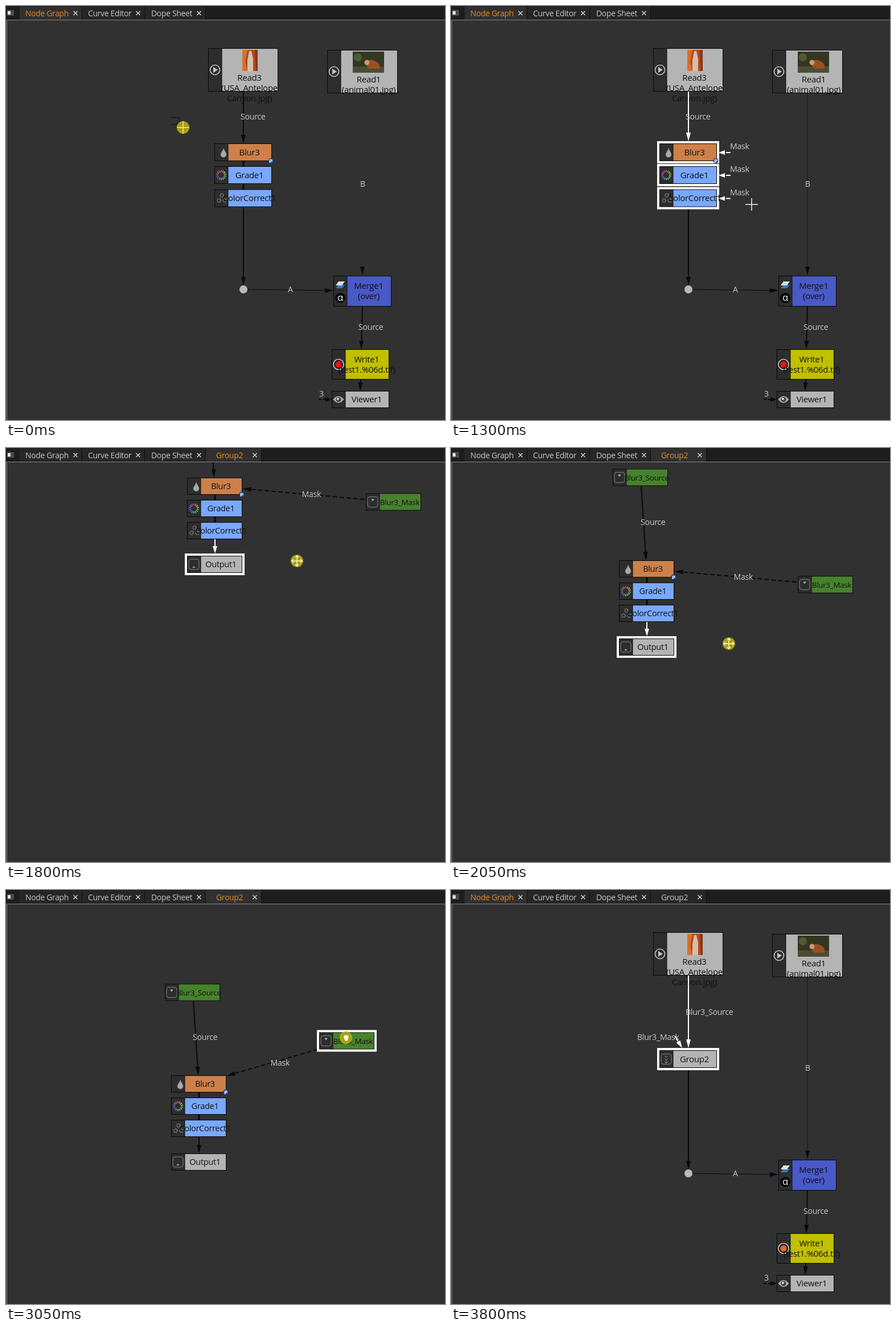
Write an HTML page that moves like this. It is 771x726 px and loops after 4850 ms.

```html
<!DOCTYPE html>
<html lang="en">
<head>
<meta charset="utf-8">
<title>Grouping nodes</title>
<style>
  html, body { margin: 0; width: 100%; height: 100%; overflow: hidden; background: #313131; }
  svg { display: block; width: 771px; height: 726px; }
  text { font: 14.2px "Open Sans", "Noto Sans", sans-serif; letter-spacing: -.3px; fill: #c8c8c8; white-space: pre; }
  .tab { font-size: 13.9px; }
  .node { font-size: 15px; fill: #111; text-anchor: middle; }
  .key { font-size: 26px; font-weight: 700; letter-spacing: 0; fill: #fff; text-anchor: middle; }
</style>
</head>
<body>
<svg id="stage" viewBox="0 0 771 726"></svg>
<script>
const LOOP = 4850;
const ORANGE = '#e88a28', GREY = '#b4b4b4', BLUE = '#7aa8ff', CLAY = '#cd804a', GREEN = '#47822d';

const rect = (x, y, w, h, fill, extra = '') =>
  `<rect x="${x}" y="${y}" width="${w}" height="${h}" fill="${fill}" ${extra}/>`;
const circle = (x, y, r, fill, extra = '') =>
  `<circle cx="${x}" cy="${y}" r="${r}" fill="${fill}" ${extra}/>`;
const path = (d, stroke, width = 1, fill = 'none', extra = '') =>
  `<path d="${d}" stroke="${stroke}" stroke-width="${width}" fill="${fill}" ${extra}/>`;
// y is the middle of the capitals
const text = (x, y, str, cls = '', style = '') =>
  `<text x="${x}" y="${y + 5}" class="${cls}" style="${style}">${str}</text>`;
const move = (x, y, content) => `<g transform="translate(${x} ${y})">${content}</g>`;

function link(x1, y1, x2, y2, { color = '#080b0b', width = 2, dash = '', opacity = 1, head = 15 } = {}) {
  const len = Math.hypot(x2 - x1, y2 - y1);
  const angle = Math.atan2(y2 - y1, x2 - x1) * 180 / Math.PI;
  return `<g transform="translate(${x1} ${y1}) rotate(${angle})">` +
    path(`M0 0H${len - head}`, color, width, 'none', `stroke-dasharray="${dash}" opacity="${opacity}"`) +
    path(`M${len} 0l${-head} -4v8z`, 'none', 0, color) + '</g>';
}

// Icons are drawn around their own centre
const ring = (n, inner, outer, width, sat = 60) => Array.from({ length: n }, (_, i) =>
  path(`M0 ${-inner}V${-outer}`, `hsl(${i * 360 / n} ${sat}% 60%)`, width, 'none',
    `transform="rotate(${i * 360 / n})"`)).join('');
const roundBox = '<rect x="-9" y="-9" width="18" height="18" rx="4" fill="none" stroke="#858585"/>';
const icons = {
  play: circle(0, 0, 8.5, 'none', 'stroke="#c4c4c4" stroke-width="1.6"') + path('M-3 -5L5 0L-3 5Z', 'none', 0, '#c4c4c4'),
  drop: path('M4 -7C6 -2 9 1 9 4A5 5 0 0 1 -1 4C-1 1 3 -2 4 -7Z', '#777', .6, '#aaa'),
  wheel: ring(14, 5, 9, 1.5),
  trio: [[1, -5], [-4, 4], [6, 4]].map(([x, y]) => move(x, y, ring(7, 2, 4, 1.2, 25))).join(''),
  merge: path('M-8 4L-3 -2H8L3 4Z', 'none', 0, '#2a7fc4', 'transform="translate(0 -9)"') +
    path('M-8 0L-3 -7H8L3 0Z', 'none', 0, '#dedede', 'transform="translate(0 -10)"') +
    circle(0, 12, 9, '#080808') + text(-5, 12, 'α', '', 'font-size:17px;fill:#eee'),
  eye: path('M-9 0Q0 -11 9 0Q0 11 -9 0Z', '#bbb', 1, '#a9a9a9') + circle(0, 0, 4.5, '#444') + circle(-1, -1, 2, '#ddd'),
  input: roundBox + path('M-3 -5H3L0 -1Z', 'none', 0, '#9ab0c0'),
  output: roundBox + path('M-3 6H3L0 3Z', 'none', 0, '#b39a82'),
  group: roundBox + path('M-3 -6L0 -3L3 -6M-3 -1L0 2L3 -1M0 2V7M-3 5L0 7L3 5', '#999'),
};
const record = color => circle(0, 0, 9, '#222', 'stroke="#c9c9c9" stroke-width="1.6"') + circle(0, 0, 5.5, color);

function node(x, y, w, h, color, icon, lines, { selected = false, firstLine = h / 2, size = 15, split = 24 } = {}) {
  return move(x, y,
    (selected ? rect(-4, -4, w + 8, h + 8, '#fff') : '') +
    rect(.5, .5, w - 1, h - 1, '#2d2d2d', 'stroke="#080808"') +
    rect(split, 1, w - split - 1, h - 2, color) + path(`M${split} 0V${h}`, '#101010') +
    move(split / 2, h / 2, icon) +
    lines.map((s, i) => text((w + split) / 2 - 1, firstLine + i * 18, s, 'node', `font-size:${size}px`)).join(''));
}

const badge = (x, y) => circle(x, y, 4.5, '#1650b0') +
  text(x - 3, y - 1.5, 'P', '', 'font-size:9.5px;font-weight:700;fill:#fff');

function tabs(active, grouped) {
  const list = [['Node Graph', 24, 110, 34], ['Curve Editor', 134, 110, 144], ['Dope Sheet', 244, 107, 255]];
  if (grouped) list.push(['Group2', 351, 98, 369]);
  return rect(0, 0, 771, 24, '#1d1d1d') + rect(2, 7, 12, 10, '#4a4a4a') + rect(3, 9, 5, 6, '#e4e4e4') +
    list.map(([name, x, w, tx]) =>
      rect(x, 1, w, 23, name === active ? '#303030' : '#262626') + path(`M${x + w - .5} 1V24`, '#111') +
      text(tx, 13, name, 'tab', name === active ? `fill:${ORANGE}` : '') +
      path(`M${x + w - 15.5} 9l7 7m0 -7l-7 7`, '#d0d0d0', 1.5)).join('') +
    path('M1.5 726V24.5H771', '#858585');
}

const canyonPhoto = rect(415, 77, 27, 37, '#b5481a') + path('M415 77H424L420 98L424 114H415Z', 'none', 0, '#d9702a') +
  path('M427 79H431L434 92V114H424V95Z', 'none', 0, '#d3bfae') + path('M437 77H442V114H439Z', 'none', 0, '#8a3414');
const animalPhoto = rect(609, 80, 55, 37, '#33371f') + rect(609, 106, 55, 11, '#4c4c36') +
  circle(618, 90, 7, '#4d5c33') + path('M632 103Q636 91 647 96Q658 100 656 110H638Z', 'none', 0, '#9a4f22') +
  circle(634, 99, 4.5, '#c79a72');

function nodeGraph({ stage, thinLine = .7, selected = false, ctrl = false }) {
  const white = { color: '#fff' };
  const grouped = stage === 'grouped';
  let out = link(626, 153, 626, 472, { width: 1, opacity: thinLine }) +
    link(424, 497, 575, 499, { width: 1 }) + link(626, 526, 624, 602) + link(623, 655, 622, 675) +
    link(549, 690, 573, 690, { dash: '5 3', head: 12 });
  out += node(355, 74, 123, 76, GREY, icons.play, ['Read3', '(USA_Antelope', 'Canyon.jpg)'], { firstLine: 52 }) + canyonPhoto;
  out += node(564, 77, 124, 76, GREY, icons.play, ['Read1', '(animal01.jpg)'], { firstLine: 52 }) + animalPhoto;
  if (grouped) {
    out += link(417, 150, 417, 277, white) + link(393, 256, 406, 277, { ...white, head: 13 }) +
      link(417, 316, 417, 490) + text(412, 214, 'Blur3_Source') + text(327, 258, 'Blur3_Mask') +
      node(366, 281, 101, 31, GREY, icons.group, ['Group2'], { selected: true });
  } else {
    out += link(417, 150, 417, selected ? 237 : 241, selected ? white : {}) + link(417, 353, 417, 490) +
      path('M417 270V325', '#080b0b', 3) + text(412, 194, 'Source');
    [[241, CLAY, 'drop', 'Blur3'], [281, BLUE, 'wheel', 'Grade1'], [321.5, BLUE, 'trio', 'ColorCorrect1']]
      .forEach(([y, color, icon, name]) => {
        out += node(366, y, 101, 31, color, icons[icon], [name], { selected });
        if (selected) out += text(490, y + 5, 'Mask') + link(491, y + 16, 470, y + 16, { ...white, dash: '8 3', head: 11 });
      });
    out += badge(465, 271.5);
  }
  out += circle(417, 497, 7, '#b9b9b9') + text(495, 497, 'A') + text(622, 312, 'B') +
    text(619, 562.5, 'Source') + text(550, 679.5, '3') +
    node(575, 473, 102, 54, '#4959c6', icons.merge, ['Merge1', '(over)'], { firstLine: 18 }) +
    node(572, 602, 101, 53, '#c0c000', record(grouped ? '#ec6a16' : '#f01010'), ['Write1', '(test1.%06d.tif)'], { firstLine: 18 }) +
    node(572, 675, 101, 30, GREY, icons.eye, ['Viewer1']);
  if (ctrl) {
    out += [[417, 195], [417, 421], [500, 498], [626, 313], [624, 564]].map(([x, y]) => circle(x, y, 4.7, '#fff000')).join('') +
      rect(360, 687, 53, 39, '#000') + `<text x="386.5" y="717" class="key">Ctrl</text>`;
  }
  return out + tabs('Node Graph', grouped);
}

function groupGraph({ pan, drag = [0, 0], picked }) {
  const [dx, dy] = drag;
  const mask = { x: 657.5 + dx, y: 239.5 + dy };
  const slope = (mask.y - 212) / (mask.x - 343.5);
  const endY = 212 + slope * 49, startX = mask.x - 51, startY = mask.y - slope * 51;
  const outSelected = picked === 'output';
  const box = (x, y, color, icon, name, opts) => node(x, y, 97, 30, color, icons[icon], [name], opts);
  return move(...pan,
    link(334, 66, 342.5, 197) + text(333, 130, 'Source') +
    link(startX, startY, 392.5, endY, { dash: '8 4' }) +
    text((startX + 392.5) / 2 - 3, (startY + endY) / 2, 'Mask') +
    path('M344 225V280', '#080b0b', 3) +
    link(344, 305, 344, outSelected ? 330 : 334, outSelected ? { color: '#fff', head: 13 } : {}) +
    box(284, 36.5, GREEN, 'input', 'Blur3_Source', { size: 13.4 }) +
    box(295, 197, CLAY, 'drop', 'Blur3', { size: 14.5 }) +
    box(295, 236, BLUE, 'wheel', 'Grade1', { size: 14.5 }) +
    box(295, 275, BLUE, 'trio', 'ColorCorrect1', { size: 14.5 }) +
    box(295, 334, GREY, 'output', 'Output1', { size: 14.5, selected: outSelected }) +
    box(609 + dx, 224.5 + dy, GREEN, 'input', 'Blur3_Mask', { size: 13.4, selected: picked === 'mask' }) +
    badge(391, 226)) + tabs('Group2', true);
}

const halo = circle(0, 0, 11, '#b5ad12', 'opacity=".9"');
const plus = color => path('M-11 0H11M0 -11V11', color, 1.5);
const cursors = {
  cross: plus('#eee'),
  press: halo + plus('#f4f05c'),
  pan: halo + path('M-8 0H8M0 -8V8M-6 -3L-9 0L-6 3M6 -3L9 0L6 3M-3 -6L0 -9L3 -6M-3 6L0 9L3 6', '#fffbd0', 1.4),
  hand: halo + path('M-5 2L-7 -2L-4 -1V-6H-2V-8H0V-7H3V-5H5V2L3 7H-2Z', '#665f00', .7, '#fffbd0'),
  fist: halo + path('M-5 -2L-3 -5H5V1L3 6H-2Z', '#665f00', .7, '#fffbd0'),
};
const cursor = (kind, x, y) => move(x, y, cursors[kind]);

const marquee = rect(290.5, 195.5, 143, 125, '#0848be', 'fill-opacity=".17" stroke="#0b0e14"');
const settled = [-5, 128];
const scenes = [
  [0, () => nodeGraph({ thinLine: 0 }) + path('M290 195.5H304.5V207.5H290', '#0c0c0c') + cursor('press', 311, 213)],
  [1050, () => nodeGraph({ thinLine: .25 }) + marquee + cursor('press', 444, 328)],
  [1300, () => nodeGraph({ selected: true }) + cursor('cross', 528, 348)],
  [1550, () => nodeGraph({ selected: true, ctrl: true }) + cursor('cross', 528, 348)],
  [1800, () => groupGraph({ pan: [23, -145], picked: 'output' }) + cursor('pan', 511, 198)],
  [2050, () => groupGraph({ pan: [0, 0], picked: 'output' }) + cursor('pan', 488, 343)],
  [2300, () => groupGraph({ pan: [-3, 69], picked: 'output' }) + cursor('pan', 485, 411)],
  [2550, () => groupGraph({ pan: settled, picked: 'mask' }) + cursor('hand', 660, 367)],
  [2800, () => groupGraph({ pan: settled, drag: [-27, -51], picked: 'mask' }) + cursor('fist', 628, 313)],
  [3050, () => groupGraph({ pan: settled, drag: [-54, -103], picked: 'mask' }) + cursor('fist', 597, 259)],
  [3300, () => groupGraph({ pan: settled, drag: [-54, -103], picked: 'mask' }) + cursor('cross', 597, 259)],
  [3550, () => nodeGraph({ stage: 'grouped' })],
];

const stage = document.getElementById('stage');
let shown = -1;
function draw() {
  const t = performance.now() % LOOP;
  const index = scenes.findLastIndex(([start]) => t >= start);
  if (index !== shown) {
    shown = index;
    stage.innerHTML = rect(0, 0, 771, 726, '#313131') + scenes[index][1]();
  }
  requestAnimationFrame(draw);
}
draw();
</script>
</body>
</html>
```
